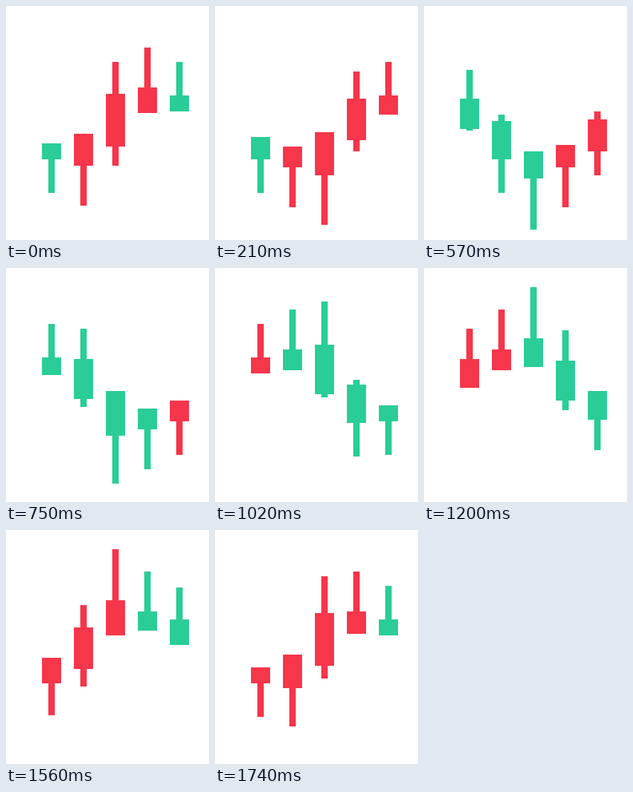
An HTML page with a canvas that plays this animation: 254 by 293 pixels, repeating every 1.77 s.

```html
<!DOCTYPE html>
<html lang="en">
<head>
<meta charset="utf-8">
<title>Candlestick wave</title>
<style>
  html, body { margin: 0; width: 100%; height: 100%; overflow: hidden; background: #fff; }
  canvas { display: block; width: 254px; height: 293px; }
</style>
</head>
<body>
<canvas id="stage" width="254" height="293"></canvas>
<script>
const ctx = document.getElementById('stage').getContext('2d');

const STEP = 30;      // ms per tick
const TICKS = 59;     // ticks per loop
const HALF = TICKS / 2;
const MIDDLE = 152;
const UP = '#2acd97';
const DOWN = '#f6364b';
const REACH = [40.9, 50, 64, 50, 40.9];

// Upper body edge, in units of reach, by ticks away from the lowest pose.
function edge(d) {
  const p = Math.min(1, Math.max(0, (d - 1.7) / 21.2));
  return -0.5 + 0.75 * (1 - Math.cos(Math.PI * p));
}

const even = v => 2 * Math.round(v / 2);

function bar(x, width, top, bottom) {
  const y = MIDDLE - even(top);
  ctx.fillRect(x - width / 2, y, width, MIDDLE - even(bottom) - y);
}

function candle(i, tick) {
  const lowest = 0.35 + 7.65 * i;
  const phase = (tick - lowest + TICKS) % TICKS;
  const d = Math.min(phase, TICKS - phase) + 0.4;
  const top = REACH[i] * edge(d);
  const bottom = -REACH[i] * edge(HALF - d);
  const x = 57 + 40 * i;

  ctx.fillStyle = (phase + 0.7) % TICKS < HALF ? UP : DOWN;
  bar(x, 8, 2 * top, 2 * bottom);
  bar(x, 24, top, bottom);
}

let start;
function draw(now) {
  start ??= now;
  const tick = Math.floor((now - start) / STEP) % TICKS;
  ctx.fillStyle = '#fff';
  ctx.fillRect(0, 0, 254, 293);
  REACH.forEach((_, i) => candle(i, tick));
  requestAnimationFrame(draw);
}
requestAnimationFrame(draw);
</script>
</body>
</html>
```
